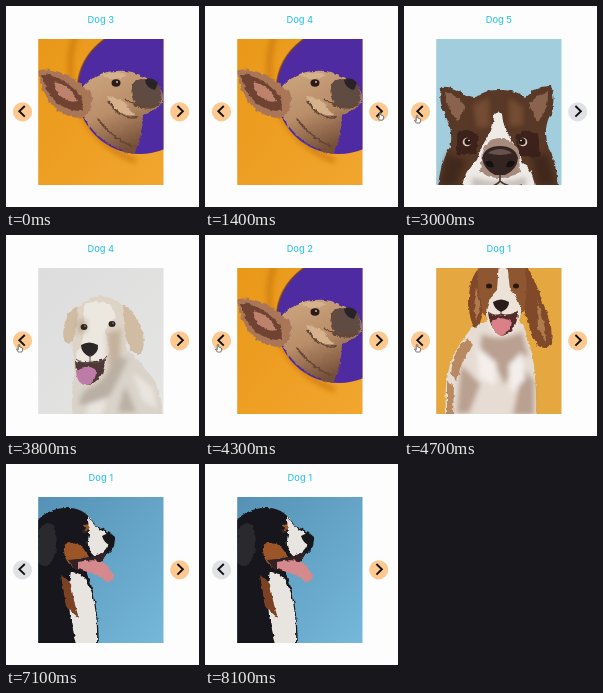
Write an HTML page that moves like this. It is 193 px wide and 201 px high and loops after 8.2 s.

```html
<!DOCTYPE html>
<html lang="en">
<head>
<meta charset="utf-8">
<title>Dog gallery</title>
<style>
html, body { margin: 0; width: 100%; height: 100%; overflow: hidden; background: #fdfdfd; }
svg { display: block; width: 100vw; height: 100vh; }
.title { font: 500 9.3px Inter, Arial, sans-serif; fill: #3cc6e6; text-anchor: middle; }
.arrow { fill: none; stroke: #111; stroke-width: 1.9; }
</style>
</head>
<body>
<svg viewBox="0 0 193 201">
  <defs>
    <clipPath id="frame"><rect x="32.2" y="33" width="125.3" height="146"/></clipPath>
    <filter id="fur" x="-10%" y="-10%" width="120%" height="120%">
      <feTurbulence type="fractalNoise" baseFrequency=".22" numOctaves="2" seed="4"/>
      <feDisplacementMap in="SourceGraphic" scale="4" xChannelSelector="R" yChannelSelector="G"/>
      <feGaussianBlur stdDeviation=".75"/>
    </filter>
    <filter id="soft" x="-30%" y="-30%" width="160%" height="160%"><feGaussianBlur stdDeviation="2.5"/></filter>
    <linearGradient id="sky" x2="1" y2="1"><stop stop-color="#5591b4"/><stop offset="1" stop-color="#75b8da"/></linearGradient>
    <linearGradient id="wall" x2="1" y2="1"><stop stop-color="#dcdddc"/><stop offset="1" stop-color="#e5e5e4"/></linearGradient>
    <linearGradient id="amber" x2="1" y2="1"><stop stop-color="#e99818"/><stop offset="1" stop-color="#f2a62f"/></linearGradient>
    <linearGradient id="tan" x2=".4" y2="1"><stop stop-color="#cda781"/><stop offset=".55" stop-color="#b98e69"/><stop offset="1" stop-color="#765039"/></linearGradient>
  </defs>

  <text class="title" id="title" x="94.8" y="17"></text>

  <g clip-path="url(#frame)">
    <!-- mountain dog -->
    <g class="dog">
      <path fill="url(#sky)" d="M32 33H158V180H32Z"/>
      <g filter="url(#fur)">
        <path fill="#17181b" d="M28 62C34 50 48 43 63 44C76 44 84 52 90 62L104 68Q110 74 108 82Q104 92 91 95L80 108Q92 130 93 184H28Z"/>
        <path fill="#292a2d" d="M33 64Q43 54 49 65Q54 85 44 100Q34 105 32 94Z"/>
        <path fill="#9c5528" d="M58 82Q68 74 77 84L84 94L69 104Q57 98 58 82ZM78 61L84 60L85 64L80 65Z"/>
        <path fill="#e8e4df" d="M82 52L93 66Q101 67 104 76Q100 90 88 92Q79 84 83 72ZM65 108Q78 108 84 124Q92 146 91 180H71Q58 140 65 108Z"/>
        <path fill="#7b4022" d="M55 111L65 120Q68 140 73 154L60 143Z"/>
        <path fill="#332427" d="M62 96Q82 95 101 87L98 94Q90 112 70 106Z"/>
        <path fill="#d5898c" d="M72 98Q90 94 98 99Q106 106 108 115Q102 121 94 113Q84 108 72 105Z"/>
      </g>
      <path fill="#171619" d="M96 72Q104 67 109 73Q110 79 104 81Q98 79 96 72Z"/>
      <ellipse cx="79" cy="67" rx="2.8" ry="2.1" fill="#3c2117"/>
      <circle cx="80" cy="66" r=".6" fill="#fff"/>
    </g>

    <!-- hound -->
    <g class="dog">
      <path fill="#e5a840" d="M32 33H158V180H32Z"/>
      <g filter="url(#fur)">
        <path fill="#e6dcd3" d="M72 88Q57 104 49 122Q38 148 43 184H132Q133 144 128 118L119 88Z"/>
        <path fill="#b98a62" d="M63 103Q49 114 47 140L53 146Q57 124 69 110ZM43 148L50 150L49 181H43Z"/>
        <path fill="#7f4a2a" d="M82 27Q64 38 65 68Q65 86 71 93Q78 88 81 70ZM119 27Q132 44 139 68Q150 92 147 108Q142 117 133 110Q125 96 119 70Z"/>
        <path fill="#b07a4c" d="M72 52Q69 70 72 86L76 73ZM133 66Q142 88 142 107L134 94Z"/>
        <path fill="#8f5632" d="M76 27H120Q125 52 120 76Q109 94 95 95Q82 88 78 72Q71 48 76 27Z"/>
        <path fill="#ece2d8" d="M95 27H103L106 55Q116 64 117 79Q113 101 96 104Q82 97 82 78Q84 63 93 55Z"/>
        <path fill="#54292a" d="M84 78Q97 83 114 77Q113 97 98 101Q87 97 84 78Z"/>
        <path fill="#d98089" d="M87 87Q97 80 107 86Q106 99 97 101Q89 98 87 87Z"/>
      </g>
      <g filter="url(#soft)" opacity=".55">
        <path fill="#94705a" d="M78 99Q95 108 118 97L124 120Q112 126 101 150Q88 120 76 116ZM57 130L76 149L65 178H53ZM119 133L130 146V180H109Z"/>
        <path fill="#fff" d="M73 112L92 128L91 151L75 142ZM105 130L118 117L121 144L106 158Z"/>
      </g>
      <path fill="#2b1c1b" d="M89 67Q97 62 105 67Q105 74 97 77Q90 74 89 67Z"/>
      <path d="M97 76V80M84 77Q91 82 97 79Q106 82 114 76" stroke="#5d3b31" fill="none"/>
      <ellipse cx="85" cy="51" rx="3" ry="2.5" fill="#29170f"/><ellipse cx="112" cy="51" rx="3" ry="2.5" fill="#29170f"/>
    </g>

    <!-- bulldog -->
    <g class="dog">
      <path fill="url(#amber)" d="M32 33H158V180H32Z"/>
      <path d="M69 30Q58 65 72 99Q88 139 130 155" fill="none" stroke="#c97810" stroke-width="6" filter="url(#soft)" opacity=".7"/>
      <circle cx="134" cy="85" r="63" fill="#4e2ba0"/>
      <path d="M99 33Q69 55 72 89" fill="none" stroke="#7d431c" stroke-width="2" opacity=".6"/>
      <g filter="url(#fur)">
        <path fill="url(#tan)" d="M76 83Q89 65 111 65Q126 64 135 70L149 75Q157 81 157 94Q152 105 137 109Q137 128 128 148Q96 142 76 109Z"/>
        <path fill="#a97758" d="M32 64Q49 61 68 73L85 87Q89 104 77 111Q64 114 50 103Q35 89 32 64Z"/>
        <path fill="#704333" d="M36 68Q55 68 76 91L77 105Q64 106 51 97Q39 86 36 68Z"/>
        <path fill="#bd826c" d="M47 76Q63 78 72 95Q63 98 52 88Z"/>
        <path fill="#614b42" d="M128 75Q141 70 152 77Q158 87 154 98Q143 107 130 99Q122 88 128 75Z"/>
        <path fill="#d6b28c" d="M94 69Q109 64 121 68Q118 73 104 73ZM101 91Q112 88 122 101L129 109Q111 111 101 91Z"/>
        <path d="M119 93Q136 105 153 98M103 95Q114 115 132 111M92 113Q106 133 126 140" fill="none" stroke="#664735" stroke-width="2"/>
      </g>
      <ellipse cx="110" cy="77" rx="4.5" ry="3.7" fill="#2a1b18"/>
      <circle cx="111" cy="76" r=".9" fill="#d8cbc4"/>
      <path d="M139 74Q146 70 152 77L149 84Q140 82 139 74Z" fill="#292226"/>
    </g>

    <!-- retriever -->
    <g class="dog">
      <path fill="url(#wall)" d="M32 33H158V180H32Z"/>
      <g filter="url(#fur)">
        <path fill="#d9d3ca" d="M71 130Q63 154 67 184H157Q156 157 146 142Q134 127 116 108Z"/>
        <path fill="#ddd3c6" d="M70 76Q78 62 94 61Q112 62 119 74L121 105Q115 130 103 145Q91 155 78 151Q66 145 68 122Q61 98 70 76Z"/>
        <path fill="#cfbca2" d="M72 71Q61 75 58 92Q55 107 63 109Q69 104 71 90ZM117 69Q128 74 135 92Q141 111 134 119Q124 120 119 100Z"/>
        <path fill="#ece7df" d="M79 69Q92 64 106 70L110 82L99 95L104 116Q99 128 84 125Q72 131 70 121L77 104Z"/>
        <path fill="#4f3738" d="M69 126Q81 129 99 124Q98 146 82 150Q70 147 69 126Z"/>
        <path fill="#bd7ba8" d="M70 135Q80 129 90 134Q91 147 80 151Q70 148 70 135Z"/>
      </g>
      <g filter="url(#soft)" opacity=".6">
        <path fill="#a5988a" d="M106 121Q103 147 79 155L72 168Q95 177 108 153L122 124ZM119 151L130 177H112Z"/>
        <path fill="#b39b82" d="M101 98L115 94L114 122L103 131ZM72 84L81 85L80 98L71 98Z"/>
        <path fill="#f4f1ec" d="M126 137L147 153L151 174L136 165ZM82 169L101 163L96 181H80Z"/>
      </g>
      <path fill="#2b2728" d="M75 110Q83 105 92 110Q93 118 84 122Q75 118 75 110Z"/>
      <path d="M84 120V127M70 124Q77 130 84 127Q94 131 101 121" fill="none" stroke="#625048"/>
      <ellipse cx="78" cy="92" rx="3.4" ry="3" fill="#32241d"/><ellipse cx="106" cy="89" rx="3.5" ry="3" fill="#32241d"/>
      <circle cx="79" cy="91" r=".6" fill="#fff"/><circle cx="107" cy="88" r=".6" fill="#fff"/>
    </g>

    <!-- collie -->
    <g class="dog">
      <path fill="#a2cddd" d="M32 33H158V180H32Z"/>
      <g filter="url(#fur)">
        <path fill="#593826" d="M37 81Q48 79 62 90L72 91Q82 83 96 84Q110 83 121 91Q134 79 147 80Q152 91 147 108Q138 122 145 143Q153 157 154 184H34Q35 159 46 141Q50 126 42 112Q34 96 37 81Z"/>
        <path fill="#8a6350" d="M41 86Q52 88 61 100L54 116Q43 104 41 86ZM144 86Q132 88 125 99L134 116Q145 103 144 86Z"/>
        <path fill="#3c241a" d="M53 127Q64 119 75 130L72 148L53 149ZM111 131Q121 119 134 129L136 151L116 150Z"/>
        <path fill="#eeebe7" d="M90 108Q94 103 98 108Q99 121 106 132Q114 143 118 155Q131 166 131 184H58Q59 165 73 154Q77 141 84 130Q90 121 90 108Z"/>
        <path fill="#a78c7e" d="M78 146Q84 132 96 132Q108 132 115 146L116 166Q96 178 76 166Z"/>
      </g>
      <g filter="url(#soft)" opacity=".55">
        <path fill="#8c5d3f" d="M69 99L85 91L86 120L73 122ZM105 92L119 101L119 119L105 120Z"/>
        <path fill="#2d1b14" d="M43 148L62 155L51 179H36ZM128 149L144 148L151 178H134Z"/>
        <path fill="#a3948b" d="M68 171Q95 180 122 171V181H68Z"/>
      </g>
      <path fill="#342522" d="M78 152Q81 140 96 140Q111 140 114 152Q113 164 101 169H91Q80 164 78 152Z"/>
      <path fill="#68524b" d="M84 147Q96 139 108 147Q96 151 84 147Z"/>
      <path fill="#171010" d="M81 156Q89 152 90 161Q83 163 81 156ZM111 156Q103 152 102 161Q109 163 111 156Z"/>
      <path d="M96 169V175M75 180Q90 183 96 175Q105 183 118 179" fill="none" stroke="#4a3431" stroke-width="1.6"/>
      <circle cx="63" cy="136" r="4.3" fill="#d6c9bd"/><circle cx="119" cy="136" r="4.3" fill="#d6c9bd"/>
      <circle cx="64" cy="135.5" r="3.5" fill="#28180f"/><circle cx="118" cy="135.5" r="3.5" fill="#28180f"/>
      <circle cx="65" cy="134.5" r=".8" fill="#fff"/><circle cx="117" cy="134.5" r=".8" fill="#fff"/>
    </g>
  </g>

  <circle id="prev" cx="16.5" cy="105.8" r="9.6"/>
  <path class="arrow" d="M18.8 100L13.3 105.3L18.8 110.6"/>
  <circle id="next" cx="173.7" cy="105.8" r="9.6"/>
  <path class="arrow" d="M171.4 100L176.9 105.3L171.4 110.6"/>

  <path id="hand" fill="#fff" stroke="#333" stroke-width=".9" stroke-linejoin="round"
    d="M-1 4V-3Q0-4.5 1-3V0L4 1Q5.5 1 5 4L4 7H-1L-3.5 3Q-3 1.5-1 4Z"/>
</svg>
<script>
const LOOP = 8200;
// [time, dog]: the caption changes first, the photo follows
const captions = [[0, 3], [1300, 4], [2100, 5], [3300, 4], [3900, 3], [4200, 2], [4500, 1]];
const photos = [[0, 3], [1500, 4], [2300, 5], [3500, 4], [4100, 3], [4400, 2], [4800, 1]];
// [time, x, y]
const path = [[500, 184, 130], [900, 175, 109], [2400, 175, 109], [2700, 13, 112], [4900, 13, 112], [5200, -8, 124]];

const el = id => document.getElementById(id);
const dogs = document.querySelectorAll('.dog');
const at = (keys, t) => keys.filter(k => k[0] <= t).pop()[1];

function moveHand(t) {
  const i = path.findIndex(k => k[0] > t);
  el('hand').style.display = i > 0 ? '' : 'none';
  if (i < 1) return;
  const [t0, x0, y0] = path[i - 1], [t1, x1, y1] = path[i];
  const p = (t - t0) / (t1 - t0), e = p * p * (3 - 2 * p);
  el('hand').setAttribute('transform', `translate(${x0 + (x1 - x0) * e} ${y0 + (y1 - y0) * e}) scale(.72)`);
}

function draw(now) {
  const t = Math.floor(now % LOOP / 100) * 100;
  const shown = at(photos, t);
  const paint = (id, off) => el(id).setAttribute('fill', off ? '#dfe1e4' : '#fdc990');
  el('title').textContent = 'Dog ' + at(captions, t);
  dogs.forEach((dog, i) => dog.style.display = i + 1 === shown ? '' : 'none');
  paint('prev', shown === 1);
  paint('next', shown === dogs.length);
  moveHand(t);
}

const start = performance.now();
function tick() {
  draw(performance.now() - start);
  requestAnimationFrame(tick);
}
tick();
</script>
</body>
</html>
```
